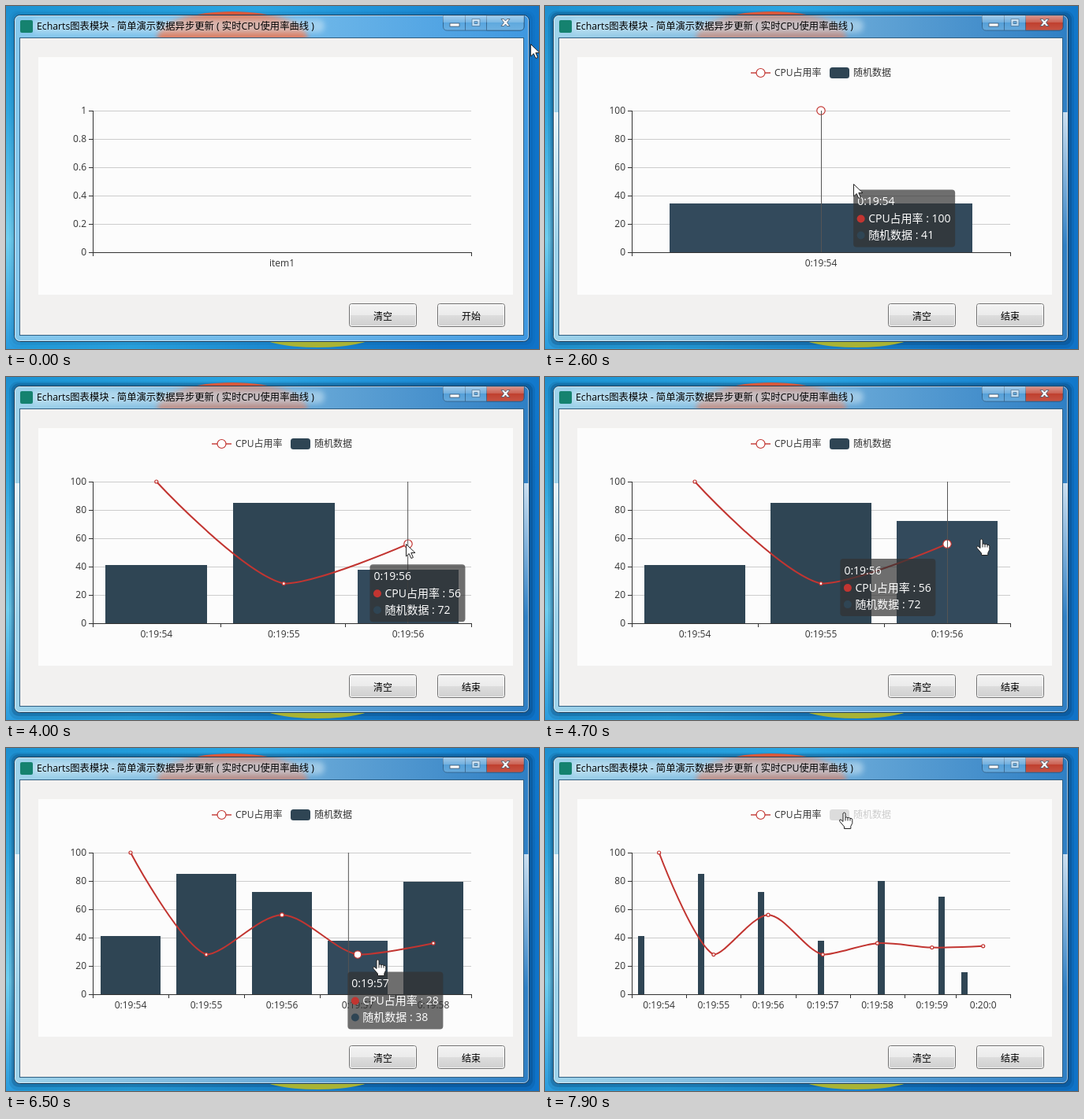
An HTML page that plays this animation: 676 px wide and 436 px high, repeating every 8 s.

```html
<!DOCTYPE html>
<html lang="zh">
<head>
<meta charset="utf-8">
<style>
html, body { margin: 0; width: 100%; height: 100%; overflow: hidden; background: #1684d2; }
svg { display: block; width: 676px; height: 436px; }
text { font: 12px "Open Sans", "Noto Sans CJK SC", "Noto Sans CJK JP", sans-serif; fill: #333; white-space: pre; }
.mid { text-anchor: middle; }
.end { text-anchor: end; }
.tip { font-size: 14px; fill: #fff; }
.btn { fill: #000; text-anchor: middle; }
</style>
</head>
<body>
<svg viewBox="0 0 676 436">
  <defs>
    <linearGradient id="sky" x2="1" y2=".25">
      <stop offset="0" stop-color="#1b93d3"/><stop offset=".45" stop-color="#2aa5e2"/><stop offset="1" stop-color="#0f73c8"/>
    </linearGradient>
    <linearGradient id="side" x2="0" y2="1">
      <stop offset="0" stop-color="#1d8fd0"/><stop offset=".3" stop-color="#2fa6df"/>
      <stop offset=".68" stop-color="#6fcff0"/><stop offset="1" stop-color="#2a9bdd"/>
    </linearGradient>
    <linearGradient id="glass" x2="1" y2="0">
      <stop offset="0" stop-color="#86c8ec"/><stop offset=".6" stop-color="#6bb5e8"/><stop offset="1" stop-color="#3f98e0"/>
    </linearGradient>
    <linearGradient id="glassOn" x2="1" y2="0">
      <stop offset="0" stop-color="#9fd3ea"/><stop offset=".55" stop-color="#6aaad8"/><stop offset="1" stop-color="#2f7fc4"/>
    </linearGradient>
    <linearGradient id="face" x2="0" y2="1">
      <stop offset="0" stop-color="#f3f3f3"/><stop offset=".5" stop-color="#ebebeb"/>
      <stop offset=".5" stop-color="#dddddd"/><stop offset="1" stop-color="#cfcfcf"/>
    </linearGradient>
    <linearGradient id="gloss" x2="0" y2="1">
      <stop offset="0" stop-color="#fff" stop-opacity=".45"/><stop offset=".5" stop-color="#fff" stop-opacity=".15"/>
      <stop offset=".5" stop-color="#fff" stop-opacity="0"/><stop offset="1" stop-color="#fff" stop-opacity=".1"/>
    </linearGradient>
    <linearGradient id="shine" x2="0" y2="1">
      <stop offset="0" stop-color="#fff" stop-opacity=".75"/><stop offset="1" stop-color="#fff" stop-opacity="0"/>
    </linearGradient>
    <filter id="soft" x="-20%" y="-60%" width="140%" height="220%"><feGaussianBlur stdDeviation="3"/></filter>
    <clipPath id="bar"><rect x="11" y="12" width="652" height="29"/></clipPath>
  </defs>

  <rect width="676" height="436" fill="url(#sky)"/>
  <rect width="18" height="436" fill="url(#side)"/>
  <g id="shade">
    <rect x="4" y="6" width="667" height="429" rx="11" fill="#04315c" opacity=".14"/>
    <rect x="7" y="8" width="661" height="423" rx="9" fill="#04315c" opacity=".25"/>
  </g>
  <ellipse cx="287" cy="40" rx="95" ry="33" fill="#d9583a"/>
  <ellipse cx="395" cy="416" rx="76" ry="18" fill="#a9b335"/>

  <rect id="frame" x="10.5" y="11.5" width="653" height="415" rx="7" stroke="#1b3c58"/>
  <rect x="11.5" y="12.5" width="651" height="413" rx="6" fill="none" stroke="#fff" stroke-opacity=".55"/>
  <g id="streak" fill="url(#shine)">
    <rect x="11" y="135" width="6" height="170"/><rect x="657" y="135" width="6" height="170"/>
  </g>
  <g clip-path="url(#bar)">
    <ellipse id="blob" cx="287" cy="40" rx="95" ry="33" fill="#e57a58" filter="url(#soft)"/>
    <rect x="32" y="17" width="372" height="17" rx="8" fill="#d5ebf7" opacity=".5" filter="url(#soft)"/>
  </g>
  <rect x="18" y="18" width="16" height="16" rx="2" fill="#15826f"/>
  <text x="39" y="30" style="font-size:12.3px;fill:#000">Echarts图表模块 - 简单演示数据异步更新 ( 实时CPU使用率曲线 )</text>

  <g stroke="#27567e" stroke-opacity=".8">
    <path d="M554.500 12V26q0 5 5 5H652q5 0 5-5V12" fill="#5fa9de" fill-opacity=".7"/>
    <path id="close" d="M609.500 12V31H652q5 0 5-5V12z"/>
    <path d="M582.500 12V31" fill="none"/>
  </g>
  <path d="M554 12h103v14q0 5-5 5h-93q-5 0-5-5z" fill="url(#gloss)"/>
  <g fill="#fff" stroke="#40566c" stroke-width=".8">
    <rect x="563" y="22" width="12" height="4"/>
    <path d="M591 16.500h10v9h-10zM594 19.500v3h4v-3z" fill-rule="evenodd" opacity=".6"/>
    <path d="M628 16.500h3.500l2 2.500 2-2.500h3.500l-3.500 4.500 3.500 4.500h-3.500l-2-2.500-2 2.500h-3.500l3.500-4.500z"/>
  </g>

  <rect x="17.500" y="40.500" width="639" height="378" fill="#f2f1f0" stroke="#315f82"/>
  <rect x="41" y="65" width="602" height="302" fill="#fcfcfc"/>
  <g fill="url(#face)" stroke="#707070">
    <rect x="435.500" y="378.500" width="85" height="29" rx="3"/>
    <rect x="547.500" y="378.500" width="85" height="29" rx="3"/>
  </g>
  <g fill="none" stroke="#fff" stroke-opacity=".8">
    <rect x="436.500" y="379.500" width="83" height="27" rx="2"/>
    <rect x="548.500" y="379.500" width="83" height="27" rx="2"/>
  </g>
  <text class="btn" x="478" y="399">清空</text>
  <text class="btn" id="run" x="590" y="399"></text>

  <g id="chart"></g>
  <g id="arrow" stroke="#222" fill="#fff">
    <path d="M.5.500V16l3.700-3.500 2.700 6 2.500-1.100-2.600-5.900H12z"/>
  </g>
  <g id="hand" stroke="#222" fill="#fff" stroke-linejoin="round">
    <path d="M0 0q1.500-2 3 0V5.500q1.500-1.300 3 .3 1.600-1 3 .6 2.500-.6 2.800 1.800v4.300l-2 4V19.500H1.500v-2.500L-4 10.500q-1.300-2.500 1-2.600L0 10.500z"/>
    <path d="M3 5.500v4M6 6V9.500M9 6.500v3" fill="none"/>
  </g>
</svg>
<script>
const LOOP = 8000, STEP = 100;
const ACTIVE = 1200, HIDE = 7754;
const LEFT = 110, WIDTH = 480, TOP = 133, BASE = 313, CHART_END = 643;
const RED = '#c23531', NAVY = '#2f4554', LIT = '#334a5c';

const cpu = [100, 28, 56, 28, 36, 33, 34];
const rand = [41, 85, 72, 38, 80, 69, 143];
const arrive = [2143, 2830, 3780, 4735, 5690, 6690, 7716];

// Turning points of the mouse: time, x, y
const mouse = [[0, 665, 48], [500, 460, 330], [900, 592, 386], [1950, 597, 385], [2150, 512, 135],
  [2300, 188, 135], [2450, 391, 226], [2600, 391, 226], [3250, 112, 205], [3350, 352, 231], [3400, 371, 231],
  [3700, 468, 230], [4000, 507, 212], [4650, 507, 212], [4700, 552, 207], [5200, 480, 200], [5350, 250, 140],
  [5500, 331, 168], [6220, 240, 250], [6330, 400, 265], [6500, 470, 270], [7600, 378, 83]];

const el = id => document.getElementById(id);
const clamp = (v, lo = 0, hi = 1) => Math.min(hi, Math.max(lo, v));
const mix = (a, b, k) => a + (b - a) * k;
const ease = k => 1 - (1 - clamp(k)) ** 3;
const yOf = v => BASE - 1.8 * v;
const f = v => +v.toFixed(2);
const count = t => arrive.filter(a => a <= t).length;
const tipWidth = i => cpu[i] === 100 ? 129 : 121;

function clock(i) {
  const s = 19 * 60 + 54 + i;
  return `0:${Math.floor(s / 60)}:${s % 60}`;
}

function mouseAt(t) {
  const i = mouse.findIndex(k => k[0] > t);
  if (i < 0) return mouse[mouse.length - 1].slice(1);
  const a = mouse[i - 1], b = mouse[i], k = (t - a[0]) / (b[0] - a[0]);
  return [mix(a[1], b[1], k), mix(a[2], b[2], k)];
}

// The tooltip trails the mouse; the pointer line eases to the category below it
function follow(t) {
  const dt = 10, pull = 1 - Math.exp(-dt / 109);
  const lineAt = (s, u) => mix(s.from, s.to, ease((u - s.since) / 300));
  let s = null;
  for (let u = arrive[0]; u <= t; u += dt) {
    const [mx, my] = mouseAt(u);
    if (mx < LEFT || mx > LEFT + WIDTH || my < TOP || my > BASE) { s = null; continue; }
    const band = WIDTH / count(u), over = Math.floor((mx - LEFT) / band), to = LEFT + band * (over + .5);
    const w = tipWidth(over), x = mx + 20 + w > CHART_END ? mx - 20 - w : mx + 20, y = my + 20;
    if (!s) s = { x, y, over, to, from: to, last: -1, since: u };
    if (to !== s.to) s = { ...s, from: lineAt(s, u), to, last: s.over, over, since: u };
    s.x = mix(s.x, x, pull);
    s.y = mix(s.y, y, pull);
  }
  return s && { ...s, line: lineAt(s, t), grow: clamp((t - s.since) / 200) };
}

// Horizontal place of a category while the axis makes room for a new one
function slot(i, n, k, at) {
  const place = m => LEFT + WIDTH / m * (i + at);
  return i >= n - 1 ? place(n) : mix(place(n - 1), place(n), k);
}

const shift = (t, n) => n ? ease((t - arrive[n - 1]) / 300) : 1;

function bars(t, n) {
  const now = Math.min(t, HIDE), k = shift(now, n);
  const left = 1 - ease((t - HIDE) / 300);
  return rand.slice(0, n).map((v, i) => {
    const x = slot(i, n, k, .1), h = 1.8 * v * ease((now - arrive[i]) / 1000);
    return { x, y: BASE - h, w: (slot(i, n, k, .9) - x) * left, h };
  });
}

// Bezier through the points, with handles held inside their bounds
function smooth(p, amount = .3) {
  const xs = p.map(q => q[0]), ys = p.map(q => q[1]);
  const hold = (x, y) => [clamp(x, Math.min(...xs), Math.max(...xs)), clamp(y, Math.min(...ys), Math.max(...ys))];
  let d = 'M' + p[0].map(f), c0 = p[0];
  for (let i = 1; i < p.length; i++) {
    const q = p[i], a = p[i - 1], b = p[i + 1];
    let c1 = q, next = q;
    if (b) {
      const before = Math.hypot(q[0] - a[0], q[1] - a[1]), after = Math.hypot(b[0] - q[0], b[1] - q[1]);
      const r = after / (before + after), vx = (b[0] - a[0]) * amount, vy = (b[1] - a[1]) * amount;
      c1 = hold(q[0] - vx * (1 - r), q[1] - vy * (1 - r));
      next = hold(q[0] + vx * r, q[1] + vy * r);
    }
    d += 'C' + [...c0, ...c1, ...q].map(f);
    c0 = next;
  }
  return d;
}

const text = (x, y, s, cls = '', fill = '') =>
  `<text x="${f(x)}" y="${f(y)}" class="${cls}"${fill && ` style="fill:${fill}"`}>${s}</text>`;
const stroke = (d, color, w = 1) => `<path d="${d}" fill="none" stroke="${color}" stroke-width="${w}"/>`;
const dot = (x, y, r, fill, line = 'none') =>
  `<circle cx="${f(x)}" cy="${f(y)}" r="${f(r)}" fill="${fill}" stroke="${line}" stroke-width="1.2"/>`;
const box = (x, y, w, h, fill, extra = '') =>
  `<rect x="${f(x)}" y="${f(y)}" width="${f(w)}" height="${f(h)}" fill="${fill}" ${extra}/>`;

function axes(t, n) {
  const cats = n || 1, k = shift(t, n);
  let s = stroke(`M${LEFT + .5} ${TOP}V314`, '#333') + stroke('M110 313.500H590', '#333');
  for (let i = 0; i <= 5; i++) {
    const y = BASE - 36 * i;
    s += stroke(`M105 ${y + .5}H110`, '#333') + text(102, y + 4, n ? i * 20 : i / 5, 'end');
  }
  for (let i = 0; i <= cats; i++) {
    s += stroke(`M${Math.round(slot(i, cats, k, 0)) + .5} 313v5`, '#333');
    if (i < cats) s += text(slot(i, cats, k, .5), 331, n ? clock(i) : 'item1', 'mid');
  }
  return s;
}

function legend(t) {
  const off = t >= HIDE;
  return stroke('M261 85H286', RED, 1.4) + dot(273.5, 85, 5.5, '#fff', RED) + text(291, 89, 'CPU占用率') +
    box(361, 78, 25, 14, off ? '#dcdcdc' : NAVY, 'rx="3.5"') + text(391, 89, '随机数据', '', off ? '#ccc' : '');
}

function tooltip({ x, y, over }) {
  const row = (dy, color, label) => dot(x + 9.5, y + dy, 5, color) + text(x + 19, y + dy + 5, label, 'tip');
  return box(x, y, tipWidth(over), 73, '#323232', 'rx="4" opacity=".7"') + text(x + 5, y + 20, clock(over), 'tip') +
    row(37, RED, 'CPU占用率 : ' + cpu[over]) + row(58, NAVY, '随机数据 : ' + rand[over]);
}

function draw(t) {
  const n = count(t), tip = follow(t), [mx, my] = mouseAt(t);
  const columns = bars(t, n);

  let s = '';
  for (let i = 1; i <= 5; i++) s += stroke(`M111 ${BASE - 36 * i + .5}H590`, '#ccc');
  columns.forEach((b, i) => {
    const x = Math.round(b.x), y = Math.round(b.y);
    s += box(x, y, Math.round(b.x + b.w) - x, BASE - y, tip && i === tip.over ? LIT : NAVY);
  });
  s += axes(t, n);
  if (n) {
    const k = shift(t, n);
    const pts = cpu.slice(0, n).map((v, i) => [slot(i, n, k, .5), yOf(v)]);
    s += legend(t) + stroke(smooth(pts), RED, 2);
    pts.forEach(([x, y], i) => {
      const big = !tip ? 0 : i === tip.over ? tip.grow : i === tip.last ? 1 - tip.grow : 0;
      s += dot(x, y, mix(2, 5.2, big), '#fff', RED);
    });
  }
  if (tip) s += stroke(`M${f(tip.line + .5)} ${TOP}V${BASE}`, '#555') + tooltip(tip);
  el('chart').innerHTML = s;

  const onBar = tip && columns.some(b => mx > b.x && mx < b.x + b.w && my > b.y);
  const onLegend = n && my < 93;
  for (const id of ['arrow', 'hand']) {
    el(id).setAttribute('transform', `translate(${f(mx)} ${f(my)})`);
    el(id).style.display = (id === 'hand') === Boolean(onBar || onLegend) ? '' : 'none';
  }

  const on = t >= ACTIVE;
  el('run').textContent = on ? '结束' : '开始';
  el('shade').style.opacity = on ? 1 : .35;
  el('blob').style.opacity = on ? .6 : .9;
  el('streak').style.display = on ? '' : 'none';
  el('frame').setAttribute('fill', on ? 'url(#glassOn)' : 'url(#glass)');
  el('close').setAttribute('fill', on ? '#c0402f' : '#5fa9de');
}

const start = performance.now();
function tick() {
  const t = (performance.now() - start) % LOOP;
  draw(Math.floor(t / STEP) * STEP);
  requestAnimationFrame(tick);
}
tick();
</script>
</body>
</html>
```
